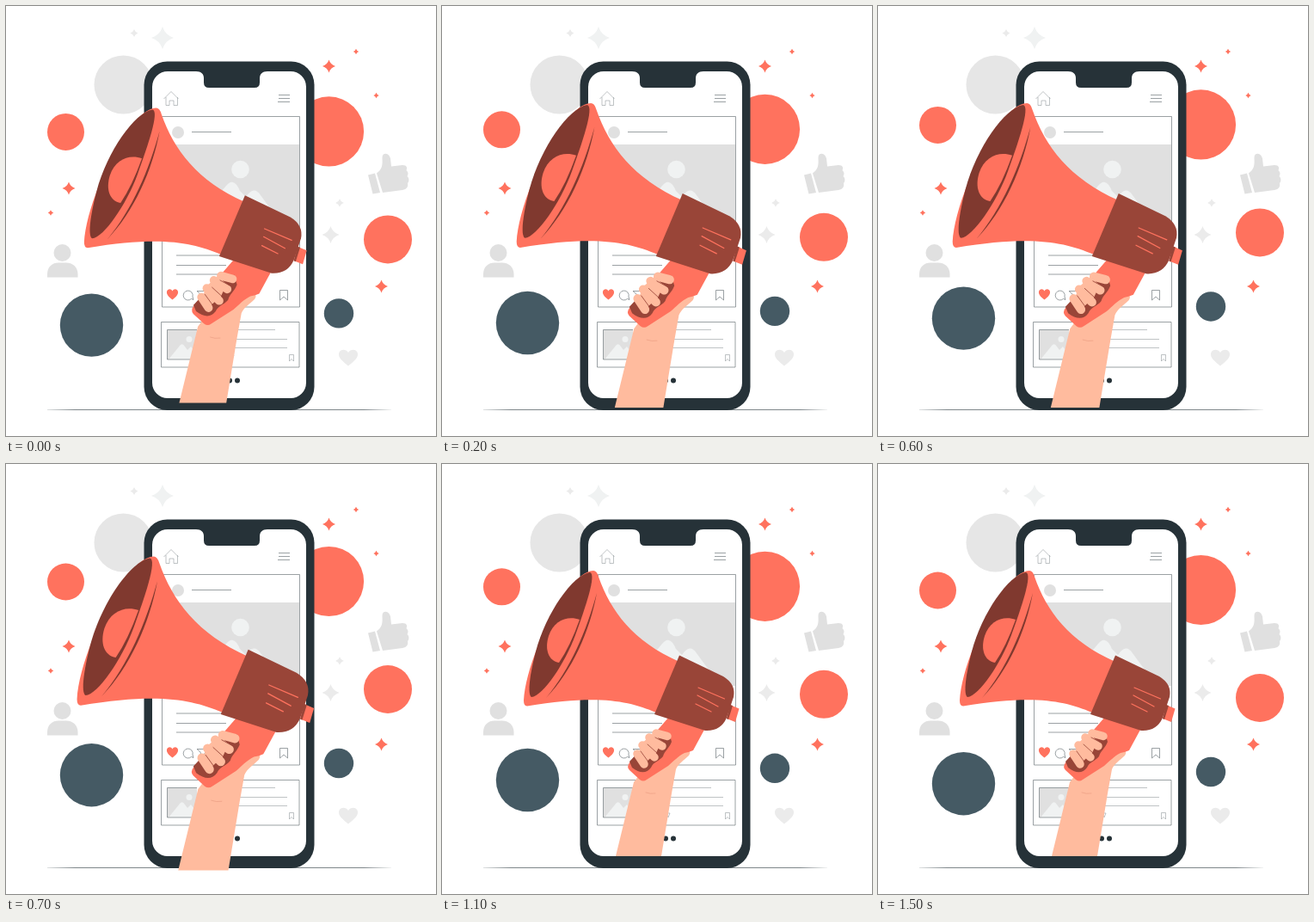
Animation, 500 px wide and 500 px high, one loop 1.6 s. Source, as an HTML page:

```html
<!DOCTYPE html>
<html lang="en">
<head>
<meta charset="utf-8">
<title>Megaphone and phone</title>
<style>
html, body { margin: 0; width: 100%; height: 100%; overflow: hidden; background: #fff; }
svg { display: block; width: 100vw; height: 100vh; }
.coral { fill: #ff725e; }
.dark { fill: #263238; }
.slate { fill: #455a64; }
.band { fill: #994538; }
.inner { fill: #80392f; }
.skin { fill: #ffbb9e; }
.grey { fill: #e0e0e0; }
.pale { fill: #ebebeb; }
.badge { fill: #e6e6e6; }
.faint { fill: #f0f2f2; }
.white { fill: #fff; }
.line { fill: none; stroke: #70797d; stroke-width: .7; }
.thin { fill: none; stroke: #949b9e; stroke-width: .6; }
.round { fill: none; stroke-linecap: round; stroke-linejoin: round; }
</style>
</head>
<body>
<svg viewBox="0 0 500 500">
  <defs>
    <linearGradient id="ground" gradientUnits="userSpaceOnUse" x1="48" y1="0" x2="448" y2="0">
      <stop offset="0" stop-color="#70797d" stop-opacity=".25"/>
      <stop offset=".08" stop-color="#70797d"/>
      <stop offset=".92" stop-color="#70797d"/>
      <stop offset="1" stop-color="#70797d" stop-opacity=".1"/>
    </linearGradient>
  </defs>
  <rect x="48" y="469" width="400" height=".9" fill="url(#ground)"/>
  <g id="stars"></g>

  <!-- side icons -->
  <circle class="badge" cx="136.5" cy="91.5" r="34"/>
  <g class="grey">
    <circle cx="65.5" cy="287" r="10"/>
    <path d="M48 315.5V312C48 303 54 298.5 61 298.5H70C78 298.5 83.5 304 83.5 312V315.5Z"/>
    <path d="M421 196.5L429 194.5L435 217L426.5 218.500Z"/>
    <path d="M431 194.5C437 190 438 186 437.500 177C437 170 445 170 447 177L448 186.500L461 185C466 185 467 188 465.500 191C468 193 468 196 466.500 198C469 200 469 204 467 206C468 210 466 213 461 214L438 217Z"/>
  </g>
  <path class="pale" d="M398 418.5C390 412 386.5 409 387 404C388 399 395 398 398 403C401 398 408 399 409 404C409.500 409 406 412 398 418.500Z"/>

  <g class="bob"><circle class="coral" cx="375.5" cy="146.5" r="40.6"/></g>

  <!-- phone -->
  <rect class="dark" x="160.5" y="64.5" width="198" height="405.5" rx="27"/>
  <path class="white" d="M188 76H221C227 76 230 79 230 84V89Q230 95 236 95H289Q295 95 295 89V84C295 79 298 76 304 76H331A18 18 0 0 1 349 94V438A18 18 0 0 1 331 456H188A18 18 0 0 1 170 438V94A18 18 0 0 1 188 76Z"/>
  <path class="thin" d="M183.5 108L192 99.5L200.5 108M186 106V115.5H190V110H195V115.5H199.5V106"/>
  <path class="line" d="M317 103.5H330M317 107.500H330M316 111.500H330"/>

  <path class="grey" d="M181.5 161H341V258H181.500Z"/>
  <circle class="faint" cx="272.5" cy="190" r="10.3"/>
  <path class="faint" d="M215 258L256 209Q265 198 272 215L279 222Q288 208 296 220L324 258Z"/>
  <circle class="grey" cx="200" cy="147" r="7"/>
  <path class="line" d="M181.5 128.5H341.500V350H181.500ZM216 146.500H262M198 290H256M198 301.500H256M198 312H256"/>
  <path class="coral" d="M193.5 341.5C189 338 186.500 335.500 187 332C188 328.500 192 328.500 193.500 331.500C195 328.500 199 328.500 200 332C200.500 335.500 198 338 193.500 341.500Z"/>
  <path class="line" d="M215.5 340.5A5.500 5.500 0 1 1 217 338L218 341.500ZM222 331.500H234L228 341.500L226 335ZM318.500 330.500H327.500V342L323 338L318.500 342Z"/>

  <path class="grey" d="M187.5 376.5H222V411H187.500Z"/>
  <circle class="faint" cx="213" cy="387.5" r="3.5"/>
  <path class="faint" d="M189 411L202 395Q205 391 208 396L211 400L215 396L222 405V411Z"/>
  <path class="line" d="M180.5 367.5H341V420H180.500ZM222 376.500H187.500V411H222"/>
  <path class="thin" d="M226 376.5H313M226 387.500H327M226 397.500H327M261 406H265L263 411ZM329.500 405.500H334.500V413L332 410.500L329.500 413Z"/>
  <circle class="dark" cx="260" cy="435.5" r="3"/>
  <circle class="dark" cx="269" cy="435.5" r="3"/>

  <!-- floating badges -->
  <g class="bob">
    <circle class="coral" cx="69.5" cy="147" r="21.5"/>
    <circle class="coral" cx="444" cy="272" r="28"/>
    <circle class="slate" cx="387" cy="358" r="17.2"/>
    <circle class="slate" cx="99.5" cy="371.7" r="36.7"/>
  </g>

  <!-- megaphone and hand -->
  <g id="horn">
    <path class="coral" d="M335 280L345.500 284.500L341 300L331 296Z"/>
    <path class="band" d="M335 280L338 281L333 297L331 296Z"/>
    <path class="skin" d="M202 456L223 370L232 358L262 340L283 333Q291 333 287 339C281 345 275 348 272 355L267 383L255 456Z"/>
    <path class="coral" d="M264 294L305 309L292 333Q288 335 282 336C274 340 269 346 263 351L238 367Q234 370 230 367L218 356Q214 352 219 346Z"/>
    <path class="band" d="M246 316L264 312L267 323C264 331 259 333 257 340C252 346 246 346 243 353C238 360 230 360 221 353L218 346Z"/>
    <path class="coral" d="M176 124Q180 124 182 131C196 171 222 206 276 230L249 289C216 275 180 268 99 281.500Q95 281.500 95 275C97 241 119 185 148 146Q162 125 176 124Z"/>
    <path class="inner" d="M172 126C152 129 121 173 109 218C102 245 99 268 104 271C117 270 143 232 155 199C167 166 180 128 172 126Z"/>
    <path class="coral" d="M160 181C146 176 130 182 124 200C119 216 124 229 136 231Q149 212 160 181Z"/>
    <path class="inner" d="M180 150C172 194 151 241 121 272C149 239 168 194 180 150Z"/>
    <path class="band" d="M276 222.500L327 247Q342 256 339 271L331 295Q324 311 306 310L247 291Z"/>
    <path class="round" stroke="#ff725e" stroke-width="1.2" d="M298 260L328.500 273M297 269L321 282M295 279L313 288"/>
    <path class="round" stroke="#ffbb9e" stroke-width="9.5" d="M249 313L262 316.500M241 318L256 328M233 327L247 341M227 337L235 349"/>
    <path class="skin" d="M246 313L255 323L249 336L238 346L227 342L232 325Z"/>
    <path class="round" stroke="#994538" stroke-width=".8" d="M248 318L259 324M239 326L250 336M231 334L239 345"/>
    <path class="round" stroke="#e99a80" stroke-width=".6" d="M237 382Q242 384 248 383"/>
  </g>
</svg>
<script>
const LOOP = 1600, STEP = 100;
const LIFT = [[0, -.6], [400, -5.7], [700, -10], [1100, -4.2], [1400, -.5], [1500, 0]];
const BEAT = [[-50, 1], [100, 1.1], [400, 1], [700, 1.1], [850, 1], [1500, 1]];
const STARS = [
  ["coral", 375.5, 70, 7.5], ["coral", 407, 53, 3.2], ["coral", 430.5, 104, 3.2],
  ["coral", 73, 212, 7.5], ["coral", 52, 240.5, 3.2], ["coral", 436.5, 326, 7.5],
  ["faint", 182, 37, 13], ["pale", 149, 31.5, 4.5], ["pale", 388, 229, 4.8], ["pale", 377.5, 266, 10]
];

const star = ([tone, x, y, r]) => {
  const k = r * .24;
  return `<path class="${tone}" d="M${x} ${y - r}Q${x + k} ${y - k} ${x + r} ${y}Q${x + k} ${y + k} ${x} ${y + r}Q${x - k} ${y + k} ${x - r} ${y}Q${x - k} ${y - k} ${x} ${y - r}Z"/>`;
};
document.getElementById("stars").innerHTML = STARS.map(star).join("");

function sample(keys, t) {
  const i = keys.findIndex(([at]) => at >= t);
  if (i <= 0) return keys[0][1];
  const [t0, a] = keys[i - 1], [t1, b] = keys[i];
  return a + (b - a) * (t - t0) / (t1 - t0);
}

const bobs = document.querySelectorAll(".bob");
const horn = document.getElementById("horn");
const start = performance.now();

function draw() {
  const t = Math.floor((performance.now() - start) % LOOP / STEP) * STEP;
  const lift = sample(LIFT, t), scale = sample(BEAT, t);
  bobs.forEach(b => b.setAttribute("transform", `translate(0 ${lift})`));
  horn.setAttribute("transform", `translate(219.5 290) scale(${scale}) translate(-219.5 -290)`);
  requestAnimationFrame(draw);
}
draw();
</script>
</body>
</html>
```
